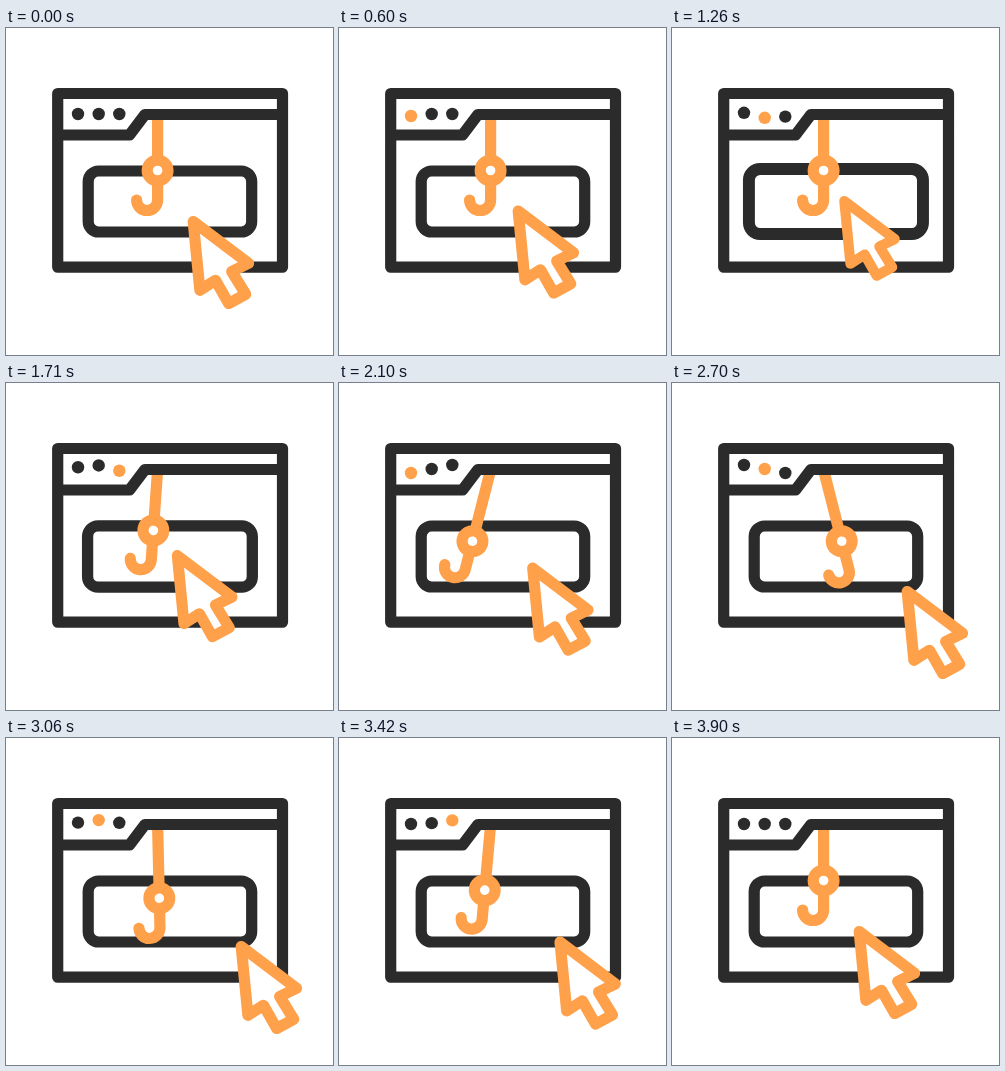
Recreate the animation shown at these times as an HTML page. Size 327 by 327 pixels, loop 4500 ms.

```html
<!DOCTYPE html>
<html lang="en">
<head>
<meta charset="utf-8">
<title>Phishing hook</title>
<style>
  html, body { margin: 0; width: 100%; height: 100%; overflow: hidden; background: #fff; }
  svg { display: block; width: 100vw; height: 100vh; }
  .line, .orange { fill: none; stroke: #2b2b2b; stroke-width: 11.2; stroke-linejoin: round; stroke-linecap: round; }
  .orange { stroke: #ffa04a; }
  .white { fill: #fff; }
</style>
</head>
<body>
<svg viewBox="0 0 327 327">
  <rect id="box" class="line" x="82.2" y="143" width="163.5" height="61" rx="10.5"/>
  <g id="hook">
    <path id="rope" class="orange"/>
    <g id="barb">
      <path class="orange" d="M151.6 158V172A10.5 10.5 0 0 1 130.6 172"/>
      <circle class="orange white" cx="151.6" cy="142.5" r="10.4"/>
    </g>
  </g>
  <path class="line" d="M51.7 65.5H276.5V239.2H51.7ZM51.7 107H123.5L139 86.5H276.5"/>
  <circle class="dot" cx="72" r="6.2"/>
  <circle class="dot" cx="92.7" r="6.2"/>
  <circle class="dot" cx="113.3" r="6.2"/>
  <path id="cursor" class="orange white" d="M187.2 193.5L242.5 235.3L225.7 243.5L239.7 266.3L222.7 275.5L209.5 252.3L193.9 262.3Z"/>
</svg>
<script>
const DARK = '#2b2b2b', ORANGE = '#ffa04a';
const LOOP = 4500, START = 300, STEP = 30, LAST = 120;
const BEAT = 20;

const $ = id => document.getElementById(id);
const dots = document.querySelectorAll('.dot');
const set = (id, transform) => $(id).setAttribute('transform', transform);
const scaleAt = (x, y, s) => `translate(${x} ${y}) scale(${s}) translate(${-x} ${-y})`;

const clamp = (v, lo, hi) => Math.max(lo, Math.min(hi, v));
const ease = p => p * p * (3 - 2 * p);
// Eased 0 to 1 between two steps
const ramp = (n, from, to) => ease(clamp((n - from) / (to - from), 0, 1));
// Eased 0 to 1 and back around a peak
const bump = (n, peak, width = BEAT) => ease(Math.max(0, 1 - Math.abs(n - peak) / width));

function drawDots(n) {
  const active = n > 0 && n < LAST ? Math.floor(n / BEAT) % dots.length : -1;
  dots.forEach((dot, i) => {
    const m = n - i * BEAT / 2;
    const wave = bump(m, 20) - bump(m, 40) + bump(m, 60) - bump(m, 80);
    dot.setAttribute('cy', 86 + 4 * wave);
    dot.setAttribute('fill', i === active ? ORANGE : DARK);
  });
}

function drawHook(n) {
  const swing = bump(n, 60) - bump(n, 80) + 0.4 * bump(n, 100);
  const drop = 18 * (ramp(n, 40, 60) - ramp(n, 90, 120));
  set('hook', `rotate(${14.3 * swing} 151.6 87)`);
  set('barb', `translate(0 ${drop})`);
  $('rope').setAttribute('d', `M151.6 87V${132 + drop}`);
}

function drawClick(n) {
  const press = bump(n, 35, 15);
  const toBox = ramp(n, 0, 20), away = ramp(n, 50, 75), home = ramp(n, 95, 120);
  const x = -16 * toBox + 64 * away - 48 * home;
  const y = -21 * toBox + 36 * away - 15 * home;
  set('box', scaleAt(164, 173.5, 1 + 0.072 * press));
  set('cursor', `translate(${x} ${y}) ${scaleAt(200, 199, 1 - 0.1 * press)}`);
}

function tick() {
  const time = performance.now() % LOOP;
  const n = clamp(Math.floor((time - START) / STEP), 0, LAST);
  drawDots(n);
  drawHook(n);
  drawClick(n);
  requestAnimationFrame(tick);
}
tick();
</script>
</body>
</html>
```
